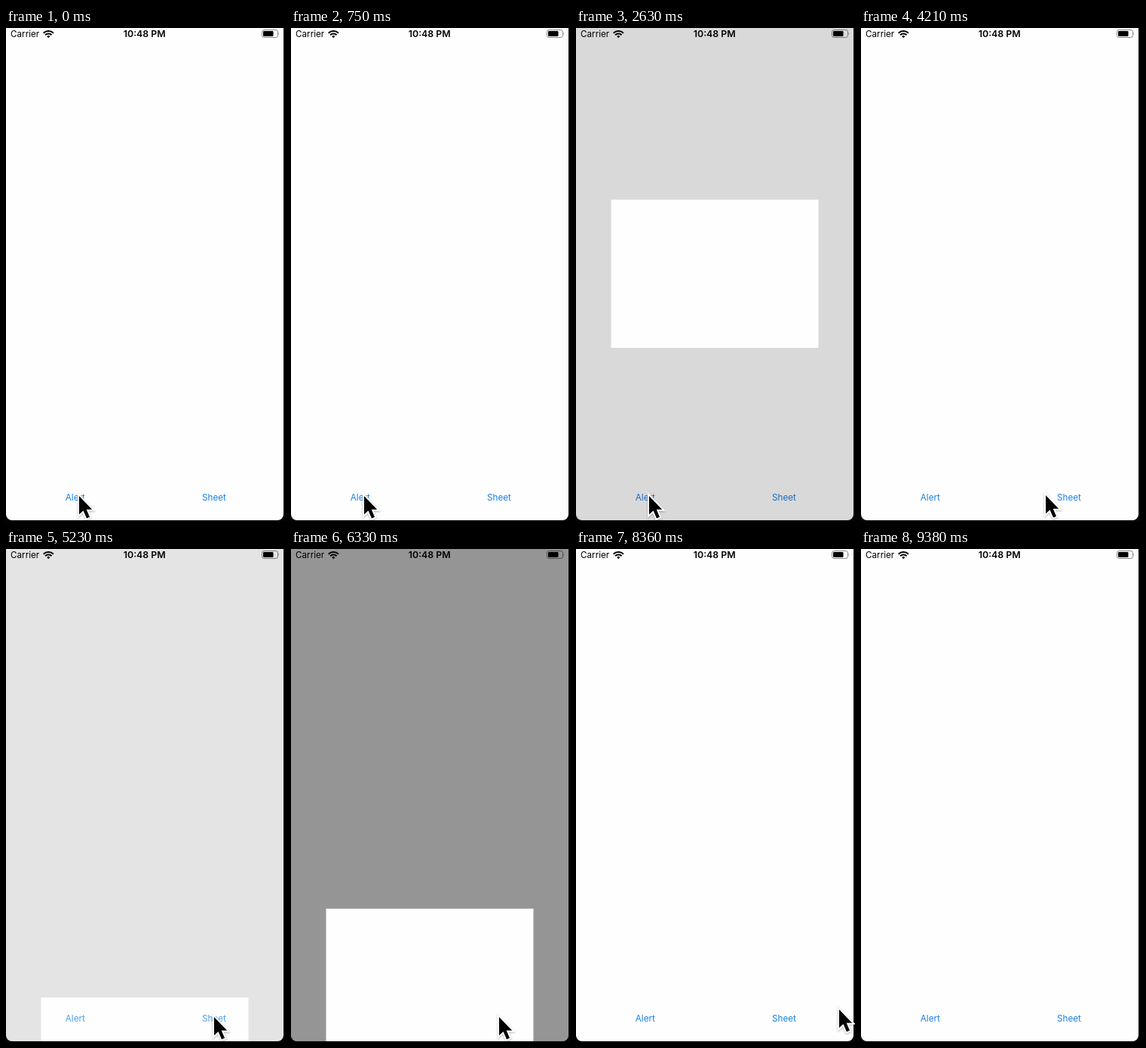
Animation, 370 px wide and 652 px high, one loop 9.4 s. Source, as an HTML page:

```html
<!DOCTYPE html>
<html lang="en">
<head>
<meta charset="utf-8">
<style>
  html, body { margin: 0; width: 100%; height: 100%; overflow: hidden; background: #060606; }
  svg { display: block; }
  text { font: 11.7px Inter, "Open Sans", sans-serif; }
  .time { font-size: 12.3px; font-weight: 600; text-anchor: middle; }
  .button { fill: #1a7fe0; text-anchor: middle; }
  #cursor { filter: drop-shadow(0 1px 1.2px rgba(0, 0, 0, .3)); }
</style>
</head>
<body>
<svg width="370" height="652" viewBox="0 0 370 652">
  <defs>
    <clipPath id="screen"><rect y="-20" width="368" height="671" rx="8"/></clipPath>
  </defs>
  <g clip-path="url(#screen)">
    <rect width="368" height="652" fill="#fefefe"/>
    <text x="6" y="12.3">Carrier</text>
    <g fill="none" stroke="#000" stroke-width="2">
      <path d="M49.7 6.8a9.3 9.3 0 0 1 13.2 0M52.1 9.3a6 6 0 0 1 8.4 0"/>
      <path d="M56.3 13.2l-2.1-2.2a3 3 0 0 1 4.2 0z" fill="#000" stroke="none"/>
    </g>
    <text class="time" x="183.7" y="12.4">10:48 PM</text>
    <rect x="339.5" y="2.5" width="21" height="10" rx="2.7" fill="none" stroke="#888"/>
    <rect x="341" y="4" width="13.5" height="7" rx="1.3"/>
    <path d="M361.5 5.7q1.5 1.8 0 3.6z" fill="#888"/>
    <text class="button" x="91.8" y="625.2">Alert</text>
    <text class="button" x="276" y="625.2">Sheet</text>
    <g id="popup">
      <rect width="368" height="652" opacity=".415"/>
      <rect id="card" x="46.5" width="275" height="196" fill="#fefefe"/>
    </g>
  </g>
  <g id="cursor">
    <path d="M0 0V24.3L5.5 19.2 10 29.4 14 27.7 9.7 17.7H17.2Z" stroke="#fff" stroke-width="4" paint-order="stroke"/>
  </g>
</svg>
<script>
const LOOP = 9400;
const [popup, card, cursor] = ["popup", "card", "cursor"].map(id => document.getElementById(id));

// Start times of showing and hiding, resting top, slide distance
const alertBox = { show: 1010, hide: 2450, top: 227, slide: 0 };
const sheet = { show: 5200, hide: 7960, top: 475.7, slide: 176 };

// Cursor moves: start, end, from, to
const moves = [
  [3620, 3940, [97, 619], [245, 618]],
  [4450, 4610, [245, 618], [276, 619]],
  [6790, 7100, [276, 619], [349, 609]],
  [9220, 9360, [349, 609], [384, 600]],
];

const progress = (t, start, length) => Math.min(1, Math.max(0, (t - start) / length));
const easeOut = x => 1 - (1 - x) ** 3;
const easeInOut = x => x * x * (3 - 2 * x);

function drawPopup(t) {
  const { show, hide, top, slide } = t < 4000 ? alertBox : sheet;
  const shown = easeOut(progress(t, show, 350)) - easeInOut(progress(t, hide, 300));
  popup.setAttribute("opacity", shown);
  card.setAttribute("y", top + slide * (1 - shown) ** 1.45);
}

function drawCursor(t) {
  let [x, y] = moves[0][2];
  for (const [start, end, from, to] of moves) {
    const p = easeInOut(progress(t, start, end - start));
    x += (to[0] - from[0]) * p;
    y += (to[1] - from[1]) * p;
  }
  cursor.setAttribute("transform", `translate(${x} ${y})`);
}

const startTime = performance.now();
function frame() {
  const t = (performance.now() - startTime) % LOOP;
  drawPopup(t);
  drawCursor(t);
  requestAnimationFrame(frame);
}
frame();
</script>
</body>
</html>
```
